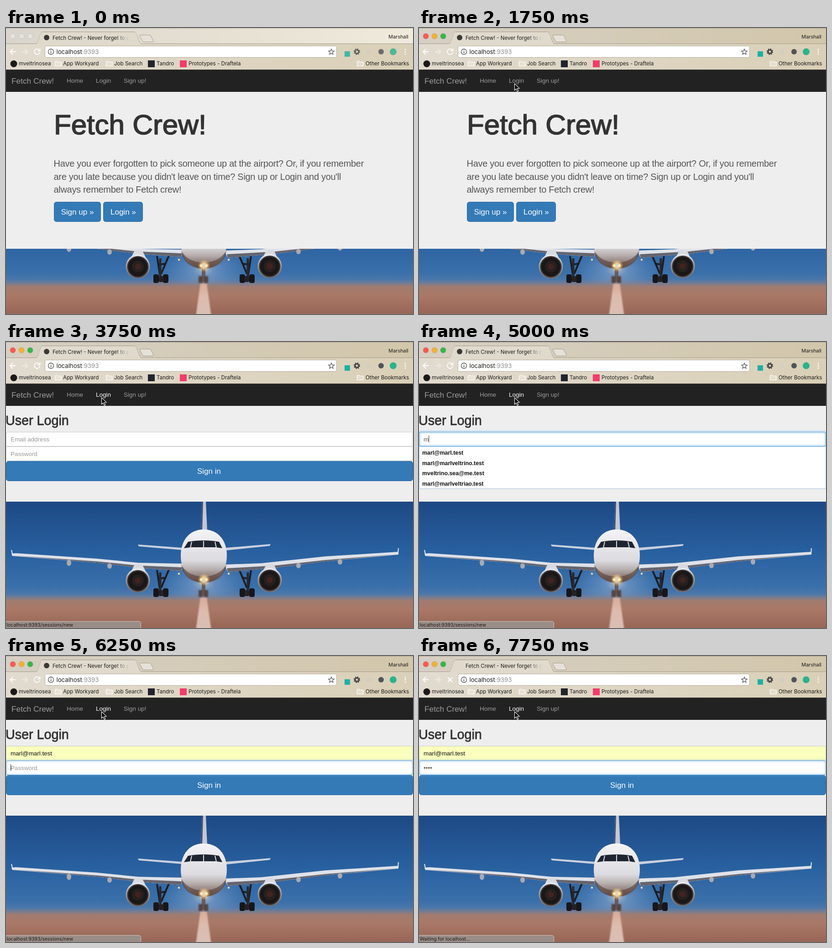
Animation, 892 px wide and 627 px high, one loop 8000 ms. Source, as an HTML page:

```html
<!DOCTYPE html>
<html lang="en">
<head>
<meta charset="utf-8">
<title>Fetch Crew!</title>
<style>
  html, body { margin: 0; width: 100%; height: 100%; overflow: hidden; background: #eee; }
  svg { display: block; width: 892px; height: 627px; }
  text { font-family: "Liberation Sans", Arial, sans-serif; white-space: pre; }
  .ui text { font-family: Inter, "Open Sans", sans-serif; font-size: 11.6px; fill: #1c1b19; }
  .nav text { font-size: 13.5px; fill: #9d9d9d; }
  .lead text { font-size: 20px; letter-spacing: -.31px; fill: #555; }
  .btn rect { fill: #337ab7; stroke: #2e6da4; }
  .btn text { font-size: 17px; fill: #fff; }
  .field { fill: #fff; stroke: #ccc; }
  .form text { font-size: 13.4px; fill: #999; }
  .form .list text { font-size: 12.45px; font-weight: bold; fill: #111; }
  .medium { fill: #333; stroke: #333; stroke-linejoin: round; }
  .ring { fill: none; stroke: #66afe9; }
</style>
</head>
<body>
<svg viewBox="0 0 892 627" xmlns="http://www.w3.org/2000/svg">
  <defs>
    <linearGradient id="sky" x1="0" y1="0" x2="0" y2="1">
      <stop offset="0" stop-color="#1d4984"/><stop offset=".5" stop-color="#28609f"/>
      <stop offset=".85" stop-color="#3a70aa"/><stop offset="1" stop-color="#5f7fa8"/>
    </linearGradient>
    <linearGradient id="ground" x1="0" y1="0" x2="0" y2="1">
      <stop offset="0" stop-color="#8a7f86" stop-opacity="0"/><stop offset=".2" stop-color="#a07c70"/>
      <stop offset=".45" stop-color="#aa7866"/><stop offset="1" stop-color="#986656"/>
    </linearGradient>
    <linearGradient id="hull" x1="0" y1="0" x2="0" y2="1">
      <stop offset="0" stop-color="#f4f4f6"/><stop offset=".58" stop-color="#dcdbe0"/>
      <stop offset=".74" stop-color="#b9b1b0"/><stop offset="1" stop-color="#6a534b"/>
    </linearGradient>
    <linearGradient id="rim" x1="0" y1="0" x2="0" y2="1">
      <stop offset="0" stop-color="#f0f0f4"/><stop offset=".35" stop-color="#a5a4aa"/>
      <stop offset="1" stop-color="#6d6a6c"/>
    </linearGradient>
    <linearGradient id="line" x1="0" y1="0" x2="0" y2="1">
      <stop offset="0" stop-color="#d9ab98"/><stop offset=".4" stop-color="#dcbcae"/>
      <stop offset="1" stop-color="#d8c0b4"/>
    </linearGradient>
    <radialGradient id="halo">
      <stop offset="0" stop-color="#fff0d0" stop-opacity=".9"/>
      <stop offset=".25" stop-color="#c3cde8" stop-opacity=".5"/>
      <stop offset="1" stop-color="#8fb2de" stop-opacity="0"/>
    </radialGradient>
    <radialGradient id="lamp">
      <stop offset="0" stop-color="#fff"/><stop offset=".4" stop-color="#ffeab0"/>
      <stop offset="1" stop-color="#ffb45a" stop-opacity="0"/>
    </radialGradient>
    <linearGradient id="bar"><stop offset="0" stop-color="#d6cfc3"/><stop offset="1" stop-color="#d2c7ab"/></linearGradient>
    <linearGradient id="dimBar"><stop offset="0" stop-color="#d9d5cd"/><stop offset=".5" stop-color="#e6e0d3"/><stop offset="1" stop-color="#f0eadb"/></linearGradient>
    <linearGradient id="tool"><stop offset="0" stop-color="#e1dbcf"/><stop offset="1" stop-color="#dad0b7"/></linearGradient>
    <linearGradient id="fade" gradientUnits="userSpaceOnUse" x1="238" y1="0" x2="270" y2="0">
      <stop offset="0" stop-color="#1c1b19"/><stop offset="1" stop-color="#1c1b19" stop-opacity="0"/>
    </linearGradient>
    <filter id="soft" x="-30%" y="-30%" width="160%" height="160%"><feGaussianBlur stdDeviation="1.6"/></filter>
    <filter id="glow" filterUnits="userSpaceOnUse" x="-10" y="180" width="912" height="100"><feGaussianBlur stdDeviation="2"/></filter>

    <g id="engine">
      <circle r="26.5" fill="url(#rim)"/>
      <circle r="23.500" cy=".5" fill="#3a3535"/>
      <circle r="21" cy=".5" fill="#1b1717"/>
      <circle r="13" fill="#272020"/>
      <circle r="6.500" fill="#43231f"/>
    </g>
    <g id="gear">
      <path d="M8 -59 L14 -18 M34 -60 L17 -20 M9 -40 L25 -42" stroke="#1c1c22" stroke-width="4" fill="none"/>
      <path d="M15 -54 V-8" stroke="#29272b" stroke-width="5"/>
      <rect x="0" y="-19" width="12" height="19" rx="4" fill="#17161a"/>
      <rect x="21" y="-19" width="12" height="19" rx="4" fill="#17161a"/>
      <rect x="12" y="-15" width="10" height="13" rx="3" fill="#242126"/>
    </g>
    <path id="folder" d="M.5 2.5 V11.5 H14 V2.5 H6.5 L5.500 1 H1.500 Z" fill="#f0ece2" fill-opacity=".5" stroke="#fff" stroke-width="1.2"/>
  </defs>

  <!-- photo -->
  <g>
    <rect y="350" width="892" height="220" fill="url(#sky)"/>
    <ellipse cx="433" cy="530" rx="95" ry="60" fill="url(#halo)" opacity=".65"/>
    <rect y="552" width="892" height="75" fill="url(#ground)"/>
    <path d="M426 560 H440 L450 632 H416 Z" fill="url(#line)" filter="url(#soft)"/>
    <path d="M430 350 H438 L441 414 H427 Z" fill="#c3c8d6"/>
    <path d="M430 350 H432 L430 414 H427 Z" fill="#424b6b"/>
    <path d="M289 444 L385 451 V456 L291 448 Z M580 443 L482 451 V457 L578 447 Z" fill="#c9d0de"/>
    <use href="#gear" x="323" y="559"/>
    <use href="#gear" transform="translate(545 559) scale(-1 1)"/>
    <path d="M12 464 L22 463 L200 475 L290 484 L390 486 L384 502 L290 495 L200 484 L14 469 Z" fill="#dfe2e9"/>
    <path d="M860 460 L700 470 L560 485 L478 488 L486 504 L590 495 L700 481 L860 466 Z" fill="#dfe2e9"/>
    <path d="M14 468 L200 481 L290 490 L386 494 L384 502 L290 495 L200 484 Z M860 465 L700 478 L590 490 L484 496 L486 504 L590 495 L700 481 Z" fill="#65656f"/>
    <path d="M12 456 L15 469 M860 452 L859 466" stroke="#e5e7ec" stroke-width="2"/>
    <g fill="#a9aab2">
      <ellipse cx="138" cy="484" rx="5" ry="7"/><ellipse cx="227" cy="491" rx="5" ry="6"/>
      <ellipse cx="641" cy="490" rx="5" ry="6"/><ellipse cx="732" cy="482" rx="5" ry="6"/>
    </g>
    <path d="M275 502 L282 487 H298 L306 502 Z M563 502 L571 487 H587 L594 502 Z" fill="#d8dae0"/>
    <use href="#engine" x="289" y="523"/>
    <use href="#engine" x="578" y="522"/>
    <path d="M433 411 C465 411 484 435 484 468 C484 500 468 527 433 528 C400 527 383 500 383 468 C383 435 402 411 433 411 Z" fill="url(#hull)"/>
    <path d="M384 488 C396 509 416 514 433 514 C450 514 470 509 483 488 C480 512 462 527 433 528 C404 527 387 512 384 488 Z" fill="#5d453e" opacity=".65"/>
    <path d="M390 452 L399 438 C420 434 447 434 467 438 L474 452 L459 450 H406 Z" fill="#1f2530"/>
    <path d="M407 438 L404 451 M433 436 V451 M458 438 L461 451" stroke="#dedfe5" stroke-width="2"/>
    <path d="M429 526 H437 V556 H429 Z" fill="#6a5a5a"/>
    <path d="M422 544 H431 V559 H422 Z M434 544 H443 V559 H434 Z" fill="#54453f" filter="url(#soft)"/>
    <circle cx="434" cy="521" r="14" fill="url(#lamp)" opacity=".8"/>
    <circle cx="428" cy="521" r="5" fill="url(#lamp)"/><circle cx="439" cy="521" r="5" fill="url(#lamp)"/>
    <circle cx="379" cy="508" r="3" fill="url(#lamp)"/><circle cx="488" cy="508" r="3" fill="url(#lamp)"/>
  </g>

  <!-- home page -->
  <g id="home">
    <rect y="140" width="892" height="344" fill="#eee"/>
    <text class="medium" x="105" y="233" font-size="62" stroke-width="1.7">Fetch Crew!</text>
    <g class="lead">
      <text x="104.500" y="304">Have you ever forgotten to pick someone up at the airport? Or, if you remember</text>
      <text x="104.500" y="332.500">are you late because you didn't leave on time? Sign up or Login and you'll</text>
      <text x="104.500" y="361">always remember to Fetch crew!</text>
    </g>
    <g class="btn">
      <rect x="105.500" y="381.500" width="102" height="43" rx="5"/><text x="120.500" y="408.500">Sign up »</text>
      <rect x="213.500" y="381.500" width="86" height="43" rx="5"/><text x="229" y="408.500">Login »</text>
    </g>
  </g>

  <!-- login page -->
  <g id="login">
    <rect y="140" width="892" height="210" fill="#eee"/>
    <text class="medium" x="-1" y="182" font-size="28.700" stroke-width=".8">User Login</text>
    <g class="btn">
      <rect x=".5" y="261.500" width="891" height="43" rx="5"/>
      <text x="445" y="288.500" text-anchor="middle">Sign in</text>
    </g>
    <g class="form">
      <rect class="field" id="mailBox" x=".5" y="197.500" width="891" height="31" rx="3.500"/>
      <rect class="field" x=".5" y="229.500" width="891" height="31" rx="3.500"/>
      <g class="ring" id="mailRing">
        <rect x=".5" y="197.500" width="891" height="31" rx="3.500" filter="url(#glow)" stroke-width="2"/>
        <rect x=".5" y="197.500" width="891" height="31" rx="3.500"/>
      </g>
      <g class="ring" id="passRing">
        <rect x=".5" y="229.500" width="891" height="31" rx="3.500" filter="url(#glow)" stroke-width="2"/>
        <rect x=".5" y="229.500" width="891" height="31" rx="3.500"/>
      </g>
      <text id="mail" x="10" y="217.500"></text>
      <text id="pass" x="10" y="249.500"></text>
      <rect id="caret" width="1" height="15" fill="#333"/>
      <g class="list" id="list">
        <rect x=".5" y="229.500" width="891" height="92" fill="#fff" stroke="#a9c6e3"/>
      </g>
    </g>
  </g>

  <!-- site navigation -->
  <g class="nav">
    <rect y="91" width="892" height="49" fill="#222"/>
    <text x="12" y="121.500" style="font-size:17.300px">Fetch Crew!</text>
    <text x="133" y="120">Home</text>
    <text x="197" y="120" id="loginLink">Login</text>
    <text x="258" y="120">Sign up!</text>
  </g>

  <!-- browser window -->
  <g class="ui">
    <rect width="892" height="36" fill="url(#bar)"/>
    <rect id="pale" width="892" height="36" fill="url(#dimBar)"/>
    <rect y="35" width="892" height="56" fill="url(#tool)"/>
    <path d="M0 34.500 H66 C72 34 74 9 80 8.500 H281 C288 9 290 34 297 34.500 H892" fill="none" stroke="#a39b8b"/>
    <path d="M66 35.500 C72 34 74 9 80 9 H281 C288 9 290 34 297 35.500 Z" fill="#e0dacd"/>
    <path d="M294 15.500 H314 Q317 15.500 318 18 L323 28 Q324 30.500 321 30.500 H303 Q300 30.500 299 28 L293 17 Z" fill="#e6e1d8" stroke="#a39b8b"/>
    <path d="M0 .5 H892" stroke="#8f897d" opacity=".6"/>
    <path d="M0 91.500 H892" stroke="#4f4b44"/>
    <g id="lights" stroke="#000" stroke-opacity=".12">
      <circle cx="15" cy="18" r="6"/><circle cx="34" cy="18" r="6"/><circle cx="53" cy="18" r="6"/>
    </g>
    <circle id="icon" cx="89" cy="21" r="6" fill="#3b3935"/>
    <text x="102" y="25.500" style="font-size:11.500px;fill:url(#fade)">Fetch Crew! - Never forget to p</text>
    <text x="882" y="22.500" text-anchor="end" style="font-size:10.900px">Marshall</text>

    <g fill="none" stroke="#fff" stroke-width="1.800">
      <path d="M21 52 H9.500 M15 46 L9 52 L15 58"/>
      <path d="M35 52 H47 M41.500 46 L47.500 52 L41.500 58" opacity=".45"/>
      <path id="reload" d="M73 48.500 A6 6 0 1 0 74 53 M74.500 45 V50 H69.500"/>
      <path id="stop" d="M63 47 L73 57 M73 47 L63 57"/>
    </g>
    <rect x="85.500" y="39.500" width="639" height="25" rx="3" fill="#fff" stroke="#b7af9f"/>
    <circle cx="98.500" cy="52" r="6" fill="none" stroke="#555" stroke-width="1.300"/>
    <path d="M98.500 51 V55.500 M98.500 48.300 V49.800" stroke="#555" stroke-width="1.500"/>
    <text x="110.500" y="56.500" style="font-size:13.200px">localhost<tspan fill="#8a8a8a">:9393</tspan></text>
    <path d="M713 46 L714.700 50.200 L719.200 50.500 L715.700 53.400 L716.900 57.800 L713 55.400 L709.100 57.800 L710.300 53.400 L706.800 50.500 L711.300 50.200 Z" fill="none" stroke="#4c4c4c" stroke-width="1.200"/>
    <g id="tools">
      <rect x="742" y="51" width="12" height="12" fill="#1fb0a4"/>
      <circle cx="769" cy="52" r="4" fill="none" stroke="#48484a" stroke-width="3.200"/>
      <circle cx="769" cy="52" r="6" fill="none" stroke="#48484a" stroke-width="2.400" stroke-dasharray="2.400 2.310"/>
      <circle cx="795" cy="52" r="6" fill="#d5cebf"/>
      <circle cx="822" cy="52" r="6" fill="#50545a"/>
      <circle cx="848.500" cy="52" r="7.500" fill="#2bb38a"/>
    </g>
    <g fill="#fff"><circle cx="875" cy="47" r="1.500"/><circle cx="875" cy="52" r="1.500"/><circle cx="875" cy="57" r="1.500"/></g>

    <circle cx="17" cy="78.500" r="7.500" fill="#1b1a19"/>
    <text x="28" y="82">mveltrinosea</text>
    <use href="#folder" x="107" y="72"/><text x="125" y="82">App Workyard</text>
    <use href="#folder" x="219" y="72"/><text x="237" y="82">Job Search</text>
    <rect x="311" y="71" width="15" height="15" fill="#20242e"/><text x="330" y="82">Tandro</text>
    <rect x="381" y="71" width="15" height="15" fill="#f43b6c"/><text x="400" y="82">Prototypes - Draftela</text>
    <use href="#folder" x="769" y="72"/><text x="788" y="82">Other Bookmarks</text>

    <g id="status">
      <path d="M-1 612.500 H291 Q295.500 612.500 295.500 617 V628 H-1 Z" fill="#9a908b" fill-opacity=".93" stroke="#c9c3be"/>
      <text id="statusText" x="1.500" y="624" style="font-size:10.500px"></text>
    </g>
  </g>

  <path id="cursor" d="M0 0 V14.500 L3.400 11.400 L5.900 17 L8.300 16 L5.900 10.500 L10.500 10.200 Z" fill="#000" stroke="#fff" stroke-width="1.100"/>
</svg>

<script>
const LOOP = 8000;
const $ = id => document.getElementById(id);
const show = (id, on) => $(id).style.opacity = Number(on);

const steps = [
  [0, { page: "home", cursor: null, active: false, hover: false, status: 0, note: "localhost:9393/sessions/new",
        mail: "", filled: false, list: false, mailRing: 0, passRing: 0, caret: "", dots: 0, loading: false }],
  [500, { cursor: [422, 25] }],
  [750, { cursor: [101, 158] }],
  [1000, { cursor: [131, 188] }],
  [1250, { cursor: [198, 111] }],
  [1500, { cursor: [207.5, 117.5] }],
  [1750, { cursor: [209.5, 122], active: true }],
  [2000, { hover: true, status: .6 }],
  [2250, { status: 1 }],
  [3750, { page: "login" }],
  [4000, { mailRing: 1, caret: "mail" }],
  [4250, { caret: "" }],
  [4750, { caret: "mail" }],
  [5000, { mail: "m", list: true }],
  [5250, { mail: "mar", list: false }],
  [5500, { mail: "marl" }],
  [5750, { caret: "" }],
  [6000, { mail: "marl@marl.test", filled: true, mailRing: .5, passRing: .3, caret: "pass" }],
  [6250, { mailRing: 0, passRing: .7 }],
  [6500, { passRing: .8, caret: "" }],
  [6750, { dots: 2, caret: "pass" }],
  [7000, { dots: 4 }],
  [7250, { loading: true }],
  [7500, { caret: "" }],
  [7750, { note: "Waiting for localhost..." }]
];

const mails = ["marl@marl.test", "marl@marlveltrino.test", "mveltrino.sea@me.test", "marl@marlveltriao.test"];
mails.forEach((mail, i) => {
  const row = document.createElementNS("http://www.w3.org/2000/svg", "text");
  row.setAttribute("x", 7);
  row.setAttribute("y", 247 + i * 22.7);
  row.textContent = mail;
  $("list").append(row);
});

function fill(id, value, hint, color) {
  $(id).textContent = value || hint;
  $(id).style.fill = value ? color : "#999";
}

function draw(s) {
  show("home", s.page === "home");
  show("login", s.page === "login");
  show("cursor", s.cursor !== null);
  if (s.cursor) $("cursor").setAttribute("transform", `translate(${s.cursor})`);

  const colors = s.active ? ["#fb5a52", "#f4b032", "#35b64a"] : Array(3).fill("#e6e3dd");
  [...$("lights").children].forEach((light, i) => light.style.fill = colors[i]);
  show("pale", !s.active);
  show("tools", s.active ? 1 : .8);
  show("icon", !s.loading);
  show("reload", !s.loading);
  show("stop", s.loading);
  $("loginLink").style.fill = s.hover ? "#fff" : "#9d9d9d";
  show("status", s.status);
  $("statusText").textContent = s.note;

  fill("mail", s.mail, "Email address", s.filled ? "#111" : "#555");
  fill("pass", "•".repeat(s.dots), "Password", "#555");
  $("mailBox").style.fill = s.filled ? "#faffbd" : "#fff";
  show("mailRing", s.mailRing);
  show("passRing", s.passRing);
  show("list", s.list);

  show("caret", s.caret !== "");
  if (s.caret) {
    const typed = s.caret === "mail" ? s.mail : s.dots;
    $("caret").setAttribute("x", 10 + (typed ? $(s.caret).getComputedTextLength() : 0));
    $("caret").setAttribute("y", s.caret === "mail" ? 205 : 237);
  }
}

const start = performance.now();
let last = -1;
function tick() {
  const t = (performance.now() - start) % LOOP;
  const past = steps.filter(([at]) => at <= t);
  if (past.length !== last) {
    last = past.length;
    draw(Object.assign({}, ...past.map(([, change]) => change)));
  }
  requestAnimationFrame(tick);
}
tick();
</script>
</body>
</html>
```
